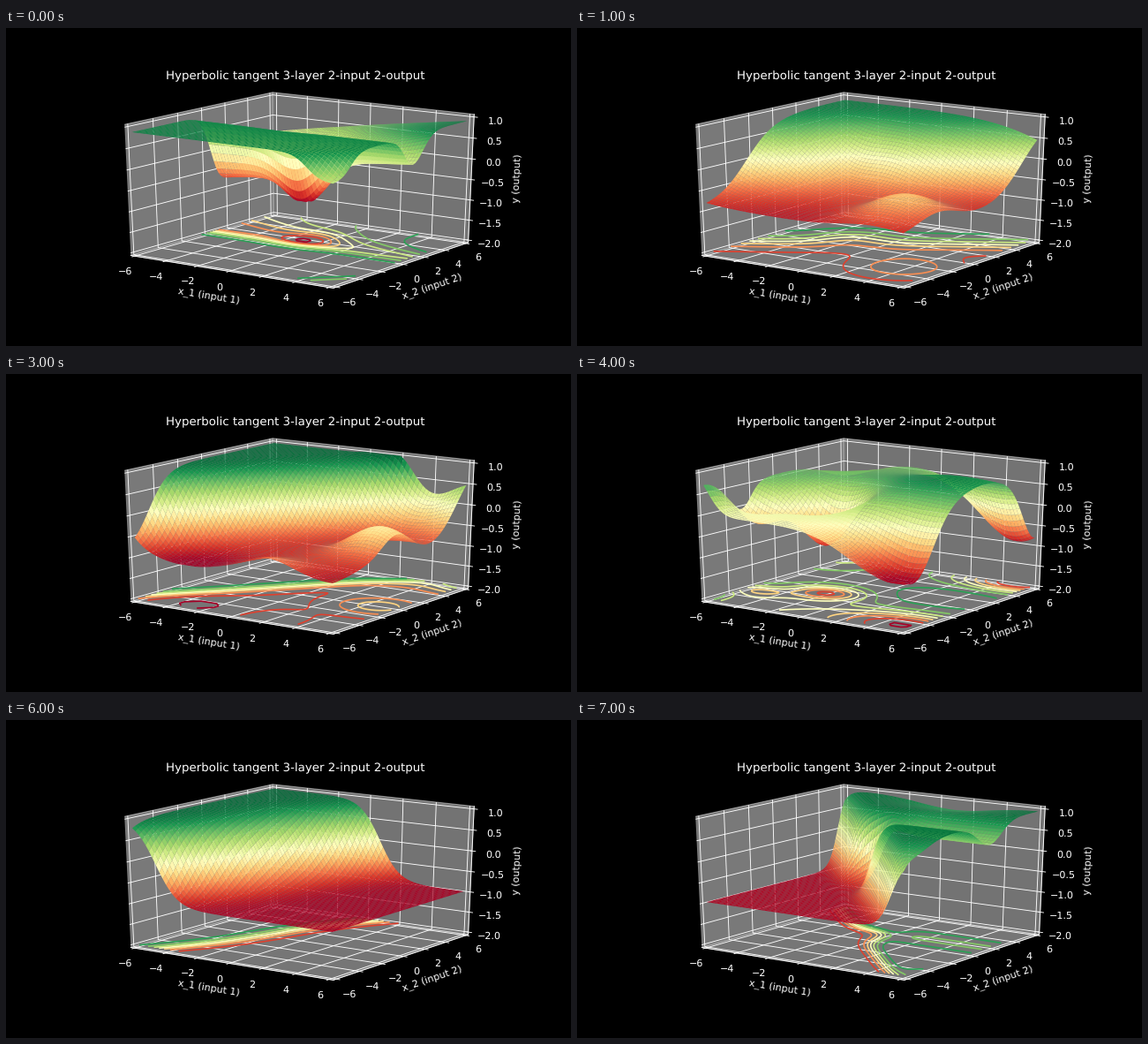
A matplotlib script for the animation above (8000 ms loop, 640 by 360 pixels).

```python
import numpy as np
import matplotlib.pyplot as plt
from matplotlib.animation import FuncAnimation

plt.style.use("dark_background")
plt.rcParams["text.hinting"] = "none"

STEP_MS = 1000
MARGIN = 1 / 48

axis = np.linspace(-6, 6, 61)
X, Y = np.meshgrid(axis, axis)


def rise(t):
    """Smooth step from 0 to 1."""
    return (1 + np.tanh(t)) / 2


def hill(cx, cy, wx, wy):
    return np.exp(-((X - cx) / wx) ** 2 - ((Y - cy) / wy) ** 2)


def trench():
    back = rise(1.5 * (Y - 0.8))
    plain = 0.88 * (1 - back) + (0.55 + 0.06 * X) * back
    width = np.where(Y > 1, 2.2 - 0.15 * X, 1.1)
    depth = 0.68 + 0.34 * rise(-X) + 0.75 * np.exp(-((X + 0.4) / 1.7) ** 2)
    corner = 0.6 * rise(1.2 * (X - Y - 10.5))
    return plain - depth * np.exp(-((Y - 1) / width) ** 2) - corner


def slope():
    return (0.9 * np.tanh(0.4 * (Y - 0.6 * X - 1))
            + 0.6 * hill(4, -3, 2.5, 2.5) - 0.5 * hill(-2, 1, 2, 2))


def peaks():
    return (-0.98 + 1.5 * hill(-4.8, 5.5, 2.2, 2.8)
            + 0.9 * hill(-6.3, 2.5, 1.8, 1.3)
            + 1.85 * hill(2.8, 5.3, 2.7, 2.3))


def shelf():
    return (-0.8 + 1.77 * rise(0.62 * (Y + 0.4 - 1.25 * (X + 2.7)) + 0.2)
            + 0.45 * hill(2.5, 6.5, 1.8, 2.5) + 1.5 * hill(6.5, 7, 2.8, 2.6)
            + 0.7 * hill(5, -0.4, 2.2, 1.9) + 0.25 * hill(2.2, -6, 1.8, 2)
            - 0.25 * hill(-2.8, -5.2, 2.8, 2) - 0.12 * hill(6, -6, 2, 2))


def waves():
    return (0.6 - 1.4 * hill(-1.8, -1.5, 2, 1.5) - 0.7 * hill(-5, -3, 1.8, 1.1)
            - 0.6 * rise(-0.7 * (Y + 3.5)) - 1.1 * hill(5.3, -5.1, 3.4, 2.3)
            + 0.9 * hill(-6.6, -6, 1.2, 2) + 0.3 * hill(4, 1, 4, 3)
            - 1.55 * hill(5, 6, 3.2, 1.8) - 0.4 * hill(-6, 6, 2.5, 2.5))


def plateau():
    return (0.98 * np.tanh(0.5 * (Y - X - 2.5))
            + 0.8 * hill(4, 2, 2.5, 2) - 0.4 * hill(-5, -3, 2, 2))


def cliff():
    return -0.98 * np.tanh(0.8 * (X + 1.9 - 0.46 * Y + 0.35 * np.sin(Y / 2)))


def ramp():
    return (0.96 * np.tanh(1.3 * (X + Y + 0.7 - 1.6 * hill(0, 1.5, 2, 2)))
            - 0.5 * rise(1.2 * (X - 0.5)) * np.exp(-((Y - 1.5) / 1.5) ** 2)
            - 0.35 * hill(6.5, -5.5, 1.4, 2) - 0.2 * hill(1, 6, 3, 2))


SCENES = [trench, slope, peaks, shelf, waves, plateau, cliff, ramp]

fig = plt.figure(figsize=(8, 4.5), dpi=80)
ax = fig.add_subplot(projection="3d", computed_zorder=False)

# Let the projection fill the wide axes instead of a centred square.
ax.apply_aspect = lambda position=None: None
ax.set_position([0.125, 0.11, 0.775, 0.77])
ax.viewLim.intervalx = (-0.095, 0.09)
ax.viewLim.intervaly = (-0.095, 0.09)
ax.view_init(elev=20, azim=-55)
ax.set_box_aspect((1, 1, 1), zoom=0.9468)

ax.set_title("Hyperbolic tangent 3-layer 2-input 2-output", y=1)
ax.set_xlabel("x_1 (input 1)")
ax.set_ylabel("x_2 (input 2)")
ax.set_zlabel("y (output)")


def set_limits():
    wide = 6 + 12 * MARGIN
    ax.set(xlim=(-wide, wide), ylim=(-wide, wide),
           zlim=(-2 - 3 * MARGIN, 1 + 3 * MARGIN),
           xticks=range(-6, 7, 2), yticks=range(-6, 7, 2),
           zticks=np.arange(-2, 1.1, 0.5))


set_limits()
shown = []


def draw(i):
    while shown:
        shown.pop().remove()
    Z = np.clip(SCENES[i](), -1, 1)
    shown.append(ax.contour(X, Y, Z, zdir="z", offset=-2,
                            cmap="RdYlGn", zorder=1))
    shown.append(ax.plot_surface(X, Y, Z, rstride=1, cstride=1, cmap="RdYlGn",
                                 vmin=-1, vmax=1, zorder=2))
    set_limits()
    return []


anim = FuncAnimation(fig, draw, frames=len(SCENES), interval=STEP_MS,
                     repeat=True, repeat_delay=0)
plt.show()
```
